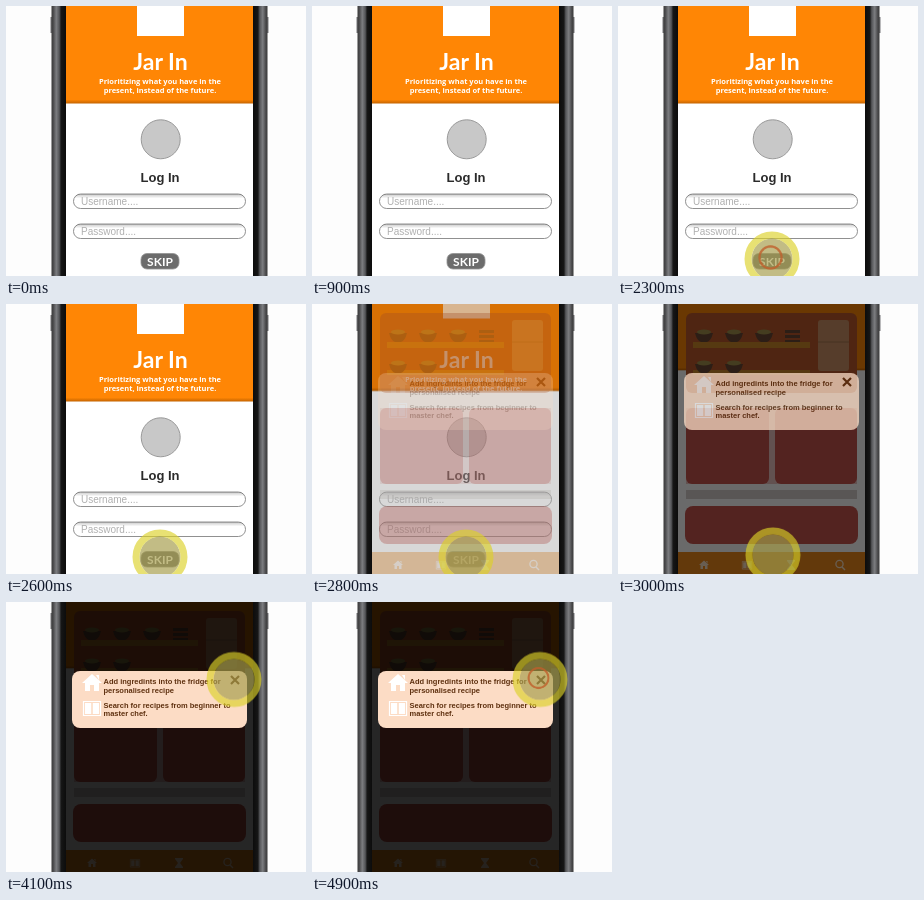
Animation of 300x270 px, one loop 5 s. Source, as an HTML page:

```html
<!DOCTYPE html>
<html lang="en">
<head>
<meta charset="utf-8">
<title>Recipe app login</title>
<style>
html, body { margin: 0; width: 100%; height: 100%; overflow: hidden; background: #fdfdfd; }
svg { display: block; width: 100vw; height: 100vh; }
.bold { font-family: Lato, sans-serif; font-weight: 700; fill: #fff; text-anchor: middle; }
.tagline { font-family: "Open Sans", sans-serif; font-size: 7.5px; }
.sans { font-family: "Liberation Sans", Arial, sans-serif; }
.tips { font-size: 7.5px; font-weight: 700; fill: #5e300f; }
.hint { font-size: 10px; fill: #b0b0b0; }
.field { fill: #fff; stroke: #909090; }

.header, .mark, .login, .page, .dim, .popup, .cursor, .dot, .ring { animation: 5s linear infinite both; }
.header { animation-name: shrink; }
.mark { animation-name: lift; }
.login { animation-name: leave; }
.page { animation-name: enter; }
.popup { animation-name: open; }
.dim { animation-name: dim; }
.cursor { animation-name: move; }
.dot { animation-name: show; }
.ring { animation-name: tap; }

@keyframes shrink {
  0%, 54% { transform: scaleY(1); }
  60%, 100% { transform: scaleY(.68); }
}
@keyframes lift {
  0%, 54% { transform: translateY(0); }
  60%, 100% { transform: translateY(-46px); }
}
@keyframes leave {
  0%, 54% { opacity: 1; }
  60%, 100% { opacity: 0; }
}
@keyframes enter {
  0%, 54% { opacity: 0; }
  60%, 100% { opacity: 1; }
}
@keyframes open {
  0%, 54% { opacity: 0; }
  62%, 100% { opacity: 1; }
}
@keyframes dim {
  0%, 54.6% { opacity: 0; }
  62.5%, 100% { opacity: .85; }
}
@keyframes show {
  0%, 24% { opacity: 0; }
  30%, 100% { opacity: 1; }
}
@keyframes move {
  0%, 32% { transform: translate(145px, 215px); animation-timing-function: ease-in-out; }
  44%, 58.5% { transform: translate(154px, 253px); animation-timing-function: ease-in-out; }
  78%, 100% { transform: translate(228px, 77.5px); }
}
@keyframes tap {
  0%, 43% { opacity: 0; transform: scale(.4); }
  46% { opacity: .8; transform: scale(1); }
  52% { opacity: 0; transform: scale(1.6); }
  52.01%, 87% { opacity: 0; transform: scale(.4); }
  94%, 100% { opacity: .8; transform: scale(.9); }
}
</style>
</head>
<body>
<svg viewBox="0 0 300 270" preserveAspectRatio="none">
  <defs>
    <linearGradient id="metal">
      <stop offset="0" stop-color="#3a3a3a"/>
      <stop offset=".12" stop-color="#4a4a4c"/>
      <stop offset=".32" stop-color="#7c7d80"/>
      <stop offset=".52" stop-color="#545558"/>
      <stop offset=".64" stop-color="#161616"/>
      <stop offset="1" stop-color="#0b0b0b"/>
    </linearGradient>
    <linearGradient id="orange" x2="0" y2="1">
      <stop offset=".96" stop-color="#ff8605"/>
      <stop offset="1" stop-color="#c46400"/>
    </linearGradient>
    <linearGradient id="inset" x2="0" y2="1">
      <stop offset="0" stop-color="#000" stop-opacity=".22"/>
      <stop offset=".3" stop-color="#000" stop-opacity="0"/>
    </linearGradient>
    <clipPath id="screen"><path d="M60 0H247V270H60z"/></clipPath>
    <g id="edge">
      <path d="M44.5 11h2v16h-2z" fill="#77777a"/>
      <path d="M45.5 0h15v270h-15z" fill="url(#metal)"/>
    </g>
    <g id="field">
      <rect class="field" x="67.5" width="172" height="14.5" rx="7.2"/>
      <rect x="67.5" width="172" height="14.5" rx="7.2" fill="url(#inset)"/>
    </g>
    <path id="house" d="M0-9 10 0H7V8H2V2H-2V8H-7V0H-10zM4-8H7V-3z"/>
    <g id="book">
      <path d="M-8.5-6.5H8.5V7.5H-8.5z" fill="none" stroke="#fff" stroke-width="1.2"/>
      <path d="M-7-5H-.8V6H-7zM.8-5H7V6H.8z"/>
    </g>
    <g id="bowl">
      <path d="M-9 0H9Q7 8 3 9H-3Q-7 8-9 0z"/>
      <ellipse cy="-1" rx="7" ry="2.5" fill="#a3924e"/>
    </g>
  </defs>

  <path d="M0 0H300V270H0z" fill="#fdfdfd"/>
  <use href="#edge"/>
  <use href="#edge" transform="matrix(-1 0 0 1 307 0)"/>

  <g clip-path="url(#screen)">
    <path d="M60 0H247V270H60z" fill="#fff"/>
    <path class="header" d="M60 0H247V97.5H60z" fill="url(#orange)"/>

    <g class="login">
      <rect class="mark" x="131" y="-17" width="47" height="47" fill="#fff"/>
      <g class="bold">
        <text x="154.5" y="64" font-size="23">Jar In</text>
        <text class="tagline" x="154" y="78.3">Prioritizing what you have in the</text>
        <text class="tagline" x="154" y="86.8">present, instead of the future.</text>
      </g>
      <circle cx="154.7" cy="133.3" r="19.5" fill="#c8c8c8" stroke="#999"/>
      <g class="sans">
        <text x="154" y="175.5" font-size="13" font-weight="700" fill="#2b2b2b" text-anchor="middle">Log In</text>
        <use href="#field" y="188"/>
        <text class="hint" x="75" y="199">Username....</text>
        <use href="#field" y="218"/>
        <text class="hint" x="75" y="229">Password....</text>
      </g>
      <rect x="135" y="247.5" width="38" height="15.5" rx="6" fill="#6c6c6c" stroke="#929292" stroke-width=".8"/>
      <text class="bold" x="154" y="259.5" font-size="12">SKIP</text>
    </g>

    <g class="page">
      <rect x="68" y="9" width="171" height="80" rx="6" fill="#bf5a2c"/>
      <g fill="#c8564e">
        <rect x="68" y="104" width="83" height="76" rx="6"/>
        <rect x="157" y="104" width="82" height="76" rx="6"/>
        <rect x="67" y="202" width="173" height="38" rx="8"/>
      </g>
      <path d="M68 104H239V180H68z" fill="#c8564e" opacity=".35"/>
      <path d="M68 186H239V195H68z" fill="#d5d0cc"/>
      <path d="M75 38H192V44H75zM75 66H192V71H75z" fill="#cf8a2a"/>
      <rect x="200" y="16" width="31" height="51" rx="3" fill="#cf9468"/>
      <path d="M200 38H231" stroke="#a87850"/>
      <g fill="#6b4a35">
        <use href="#bowl" x="86" y="29"/>
        <use href="#bowl" x="116" y="29"/>
        <use href="#bowl" x="146" y="29"/>
        <path d="M167 26h15v3h-15zM167 31h15v3h-15zM167 36h15v2h-15z"/>
        <use href="#bowl" x="86" y="60"/>
        <use href="#bowl" x="116" y="60"/>
      </g>
      <path d="M60 248H247V270H60z" fill="#ee8a1c"/>
      <g fill="#fff" opacity=".75">
        <use href="#house" transform="translate(86 261) scale(.5)"/>
        <use href="#book" transform="translate(129 261) scale(.55)"/>
        <path d="M169 256h8v1l-3 4 3 4v1h-8v-1l3-4-3-4z"/>
        <path d="M224 263l3 3" stroke="#fff" stroke-width="1.4"/>
        <circle cx="221.5" cy="260" r="3.6" fill="none" stroke="#fff" stroke-width="1.3"/>
      </g>
    </g>
    <path class="dim" d="M60 0H247V270H60z"/>

    <g class="popup">
      <rect x="66" y="69" width="175" height="57" rx="8" fill="#fcdcc5"/>
      <g fill="#fff">
        <use href="#house" x="86" y="81"/>
        <use href="#book" x="86" y="106"/>
      </g>
      <g class="sans tips">
        <text x="97.5" y="82">Add ingredints into the fridge for</text>
        <text x="97.5" y="90.5">personalised recipe</text>
        <text x="97.5" y="105.5">Search for recipes from beginner to</text>
        <text x="97.5" y="114">master chef.</text>
      </g>
      <path d="M225 74l8 8M233 74l-8 8" stroke="#5e300f" stroke-width="2.2"/>
    </g>
  </g>

  <g class="cursor">
    <g class="dot">
      <circle r="20.5" fill="#a69c4c" fill-opacity=".68"/>
      <circle r="24" fill="none" stroke="#dcd228" stroke-opacity=".65" stroke-width="7"/>
    </g>
    <g transform="translate(-1.5 -1.5)">
      <circle class="ring" r="11" fill="none" stroke="#c0602c" stroke-width="2.3"/>
    </g>
  </g>
</svg>
</body>
</html>
```
